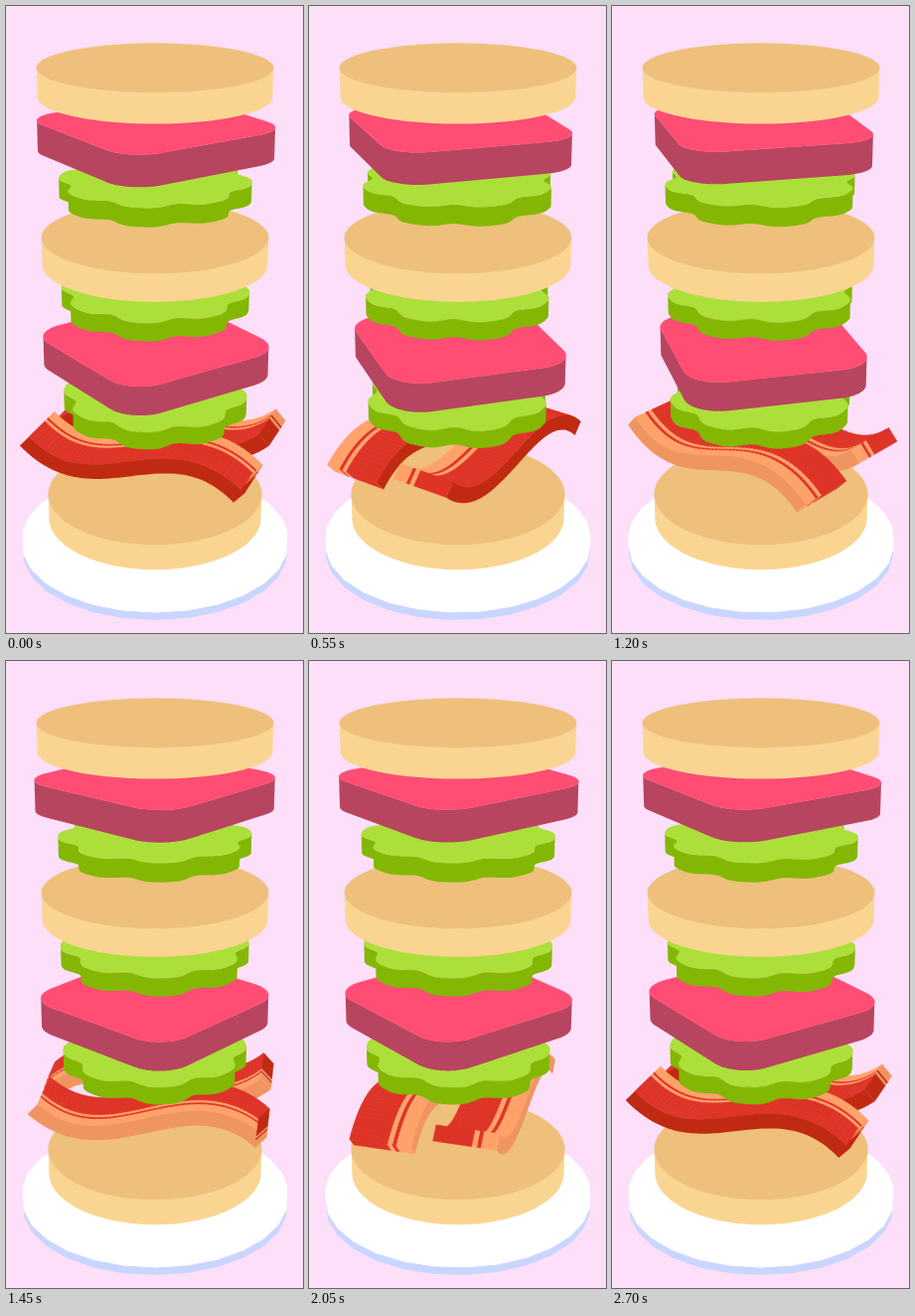
Recreate the animation shown at these times as an HTML page with a canvas. Size 299 px wide and 631 px high, loop 2.75 s.

```html
<!DOCTYPE html>
<html lang="en">
<head>
<meta charset="utf-8">
<title>Spinning sandwich</title>
<style>
  html, body { margin: 0; width: 100%; height: 100%; overflow: hidden; background: #fddff9; }
  canvas { display: block; }
</style>
</head>
<body>
<canvas id="stage" width="299" height="631"></canvas>
<script>
const ctx = document.getElementById('stage').getContext('2d');
const RAD = Math.PI / 180;

const LOOP = 2750, STEP = 50, TURN = 2703;

// Camera: perspective, looking down at the spin axis.
const FOCAL = 1500, CX = 150, CY = 315.5;
const SIN = Math.sin(21.4 * RAD), COS = Math.cos(21.4 * RAD);

const BUN = ['#eec07b', '#fad592'];
const MEAT = ['#ff4d74', '#b7455f'];
const LETTUCE = ['#acdf3a', '#83b704'];
const RED = { lit: '#de3428', dark: '#c02a12' };
const FAT = { lit: '#ffa26a', dark: '#ef9560' };

// x right, y up, z towards the viewer
function project(x, y, z) {
  const scale = FOCAL / (FOCAL - y * SIN - z * COS);
  return [CX + x * scale, CY - (y * COS - z * SIN) * scale];
}

function trace(points) {
  points.forEach((p, i) => i ? ctx.lineTo(p[0], p[1]) : ctx.moveTo(p[0], p[1]));
  ctx.closePath();
}

function polygon(points, color, seam = 0) {
  ctx.beginPath();
  trace(points);
  ctx.fillStyle = color;
  ctx.fill();
  if (seam) {
    ctx.strokeStyle = color;
    ctx.lineWidth = seam;
    ctx.stroke();
  }
}

// Outlines return [x, z]; azimuth 0 faces the viewer, positive goes right.
const polar = (radius, deg) => [radius * Math.sin(deg * RAD), radius * Math.cos(deg * RAD)];

function ring(count, point) {
  return Array.from({ length: count }, (_, i) => point(i * 360 / count));
}

const disc = (radius, spin, count = 120) => ring(count, a => polar(radius, a + spin));

const slab = spin => ring(144, a => {
  const corner = polar(56 * Math.SQRT2, Math.round(a / 90) * 90 + spin);
  const round = polar(36, a + spin);
  return [corner[0] + round[0], corner[1] + round[1]];
});

const leaf = spin => ring(240, a => {
  const notch = (1 - Math.cos(8 * a * RAD)) / 2;
  return polar(94 - 11 * notch * notch, a + spin);
});

function prism(outline, top, height, [topColor, sideColor]) {
  const upper = outline.map(([x, z]) => project(x, top, z));
  const lower = outline.map(([x, z]) => project(x, top - height, z));
  // All walls facing the viewer share one path, so no seams show between them.
  ctx.beginPath();
  upper.forEach((p, i) => {
    const j = (i + 1) % upper.length;
    if (upper[j][0] > p[0]) trace([p, upper[j], lower[j], lower[i]]);
  });
  ctx.fillStyle = sideColor;
  ctx.fill();
  polygon(upper, topColor, 0.4);
}

// Bacon strip: a wavy ribbon along u, from v0 to v1 across, mirrored by flip.
const HALF = 114, THICK = 16, WAVE = 11.5, LEVEL = -132, SLICES = 48;
const STRIPES = [[0, 0.25, FAT], [0.25, 0.31, RED], [0.31, 0.39, FAT], [0.39, 1, RED]];

function bacon(v0, v1, flip, heading) {
  const [dx, dz] = polar(1, heading);

  // side is +1 on the top surface, -1 underneath
  function at(t, v, side) {
    const slope = -flip * WAVE * (3 - 12 * t * t) / HALF;
    const offset = side * THICK / 2 / Math.hypot(1, slope);
    const u = t * HALF - slope * offset;
    const y = LEVEL - flip * WAVE * (3 * t - 4 * t ** 3) + offset;
    return project(u * dx + v * dz, y, u * dz - v * dx);
  }

  const bands = STRIPES.map(([from, to, color]) =>
    [v0 + (v1 - v0) * from, v0 + (v1 - v0) * to, color]);
  const near = dz > 0 ? 1 : -1;
  const ts = Array.from({ length: SLICES + 1 }, (_, i) => near * (2 * i / SLICES - 1));

  for (let i = 0; i < SLICES; i++) {
    const a = ts[i], b = ts[i + 1];
    for (const [v, w, color] of bands) {
      polygon([at(a, v, 1), at(a, w, 1), at(b, w, 1), at(b, v, 1)], color.lit, 0.7);
    }
  }

  const [wall, tone] = dx < 0 ? [v1, RED] : [v0, FAT];
  polygon([
    ...ts.map(t => at(t, wall, 1)),
    ...ts.map(t => at(t, wall, -1)).reverse()
  ], tone.dark);

  const shade = dx * near > 0.85 ? 'dark' : 'lit';
  for (const [v, w, color] of bands) {
    polygon([at(near, v, 1), at(near, w, 1), at(near, w, -1), at(near, v, -1)], color[shade], 0.4);
  }
}

function draw(spin) {
  ctx.fillStyle = '#fddff9';
  ctx.fillRect(0, 0, 299, 631);

  const plate = disc(141, spin, 28);
  prism(plate, -253, 9, ['#ffffff', '#c9d6ff']);
  prism(plate, -243, 10, ['#ffffff', '#ffffff']);

  const bun = disc(111.5, 0);
  const meat = slab(spin - 10);
  const lettuce = leaf(spin - 8);

  prism(disc(112.2, 0), -194.2, 28, BUN);

  const heading = spin - 110;
  const strips = [[11, 75, 1], [-75, -11, -1]];
  if (Math.sin(heading * RAD) < 0) strips.reverse();
  strips.forEach(s => bacon(...s, heading));

  prism(lettuce, -80.5, 18.5, LETTUCE);
  prism(meat, -23.1, 30, MEAT);
  prism(lettuce, 33, 18.5, LETTUCE);
  prism(bun, 89.1, 28, BUN);
  prism(lettuce, 146, 18.5, LETTUCE);
  prism(meat, 201.6, 30, MEAT);
  prism(bun, 256.8, 28, BUN);
}

function frame() {
  const time = (performance.now() + 2) % LOOP;
  draw(360 * Math.floor(time / STEP) * STEP / TURN);
  requestAnimationFrame(frame);
}
frame();
</script>
</body>
</html>
```
